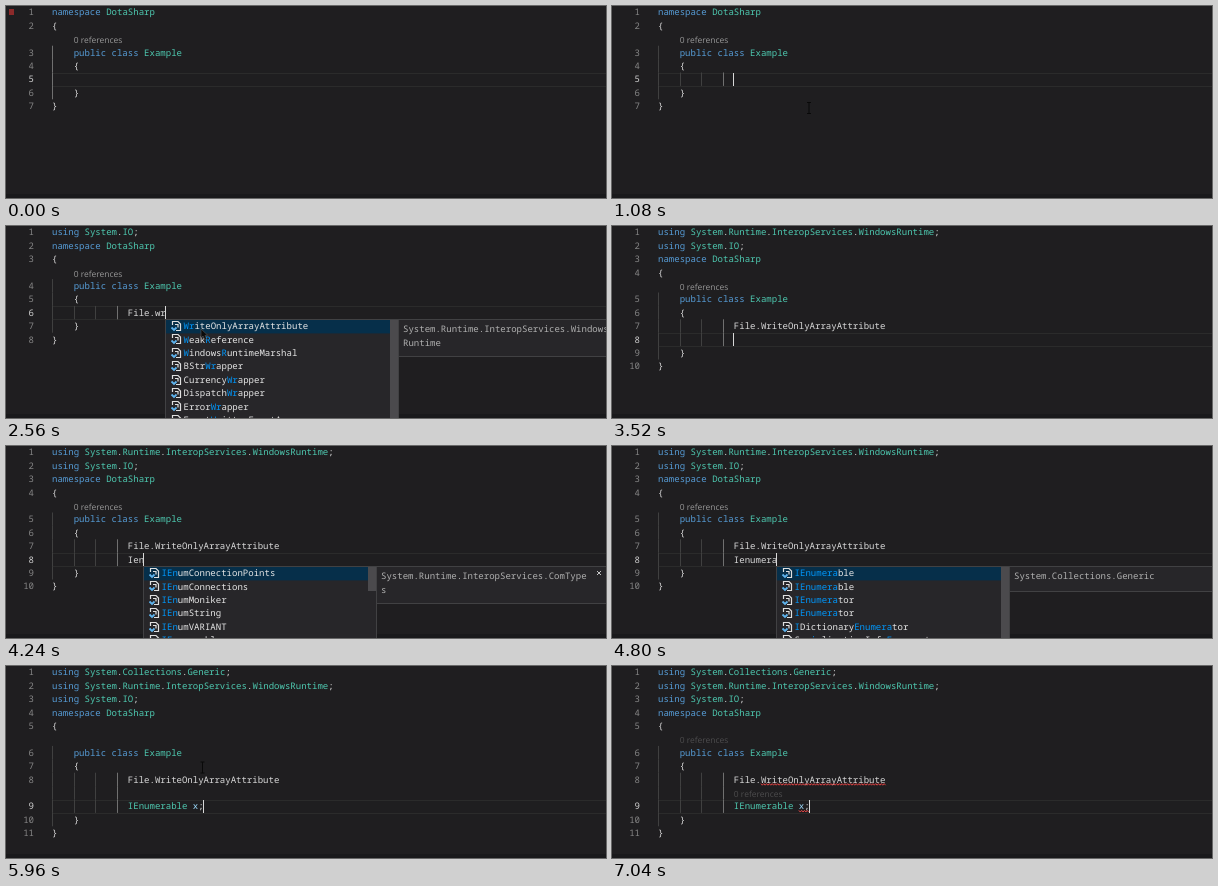
An HTML page with a canvas that plays this animation: 600x192 px, repeating every 7.08 s.

```html
<!DOCTYPE html>
<html lang="en">
<head>
<meta charset="utf-8">
<title>Auto using completion</title>
<style>
html, body { margin: 0; width: 100%; height: 100%; overflow: hidden; background: #1f1e20; }
canvas { display: block; width: 600px; height: 192px; }
</style>
</head>
<body>
<canvas id="c" width="600" height="192"></canvas>
<script>
const ctx = document.getElementById('c').getContext('2d');
const LOOP = 7080, CW = 5.418, LH = 13.4, LEFT = 46, INDENT = 14;
const MONO = "9.03px 'Noto Sans Mono', 'DejaVu Sans Mono', monospace";
const SANS = "8.45px 'Open Sans', 'Noto Sans', sans-serif";
const C = {
  bg: '#1f1e20', text: '#dadada', key: '#569cd6', type: '#4ec9b0', local: '#9cdcfe',
  num: '#858585', numOn: '#d0d0d0', lens: '#999999', guide: '#404040', guideOn: '#707070',
  border: '#414143', panel: '#272629', pick: '#062f4a', match: '#0097fb', error: '#f44747',
  item: '#e6e6e6', slider: '#4b4a4d'
};

const USINGS = ['System.Collections.Generic', 'System.Runtime.InteropServices.WindowsRuntime', 'System.IO'];
const ATTR = 'File.WriteOnlyArrayAttribute';

// [time, number of usings, first line, second line]
const EDITS = [
  [-600, 0, null], [900, 0, ''], [1200, 0, 'F'], [1400, 0, 'Fi'], [1720, 0, 'Fil'], [1840, 0, 'File'],
  [2080, 1, 'File'], [2240, 1, 'File.'], [2400, 1, 'File.w'], [2520, 1, 'File.wr'],
  [2880, 2, ATTR], [3320, 2, ATTR, '']
];
[3800, 4000, 4200, 4360, 4460, 4560, 4660, 4760].forEach((t, i) =>
  EDITS.push([t, 2, ATTR, 'Ienumera'.slice(0, i + 1)]));
EDITS.push([5080, 3, ATTR, 'IEnumerable'], [5280, 3, ATTR, 'IEnumerable '],
  [5440, 3, ATTR, 'IEnumerable x'], [5600, 3, ATTR, 'IEnumerable x;']);

// max: typed letters marked in the list; bar: height of the scroll slider
const POPUPS = [
  { from: 1240, to: 1840, max: 2, bar: 24, doc: ['System'],
    items: 'FieldAccessException FieldAttributes FieldBuilder FieldInfo FieldOffsetAttribute FieldToken File FileAccess FileInfo' },
  { from: 1840, to: 2080, max: 4, bar: 80, doc: ['System.IO'],
    items: 'File FileAccess FileAttributes FileInfo FileLoadException FileMode FileNotFoundException FileOptions FileShare' },
  { from: 2420, to: 2880, max: 2, bar: 110, doc: ['System.Runtime.InteropServices.Windows', 'Runtime'],
    items: 'WriteOnlyArrayAttribute WeakReference WindowsRuntimeMarshal BStrWrapper CurrencyWrapper DispatchWrapper ErrorWrapper EventWrittenEventArgs' },
  { from: 3840, to: 4480, max: 5, bar: 24, doc: ['System.Runtime.InteropServices.ComType', 's'],
    items: 'IEnumConnectionPoints IEnumConnections IEnumMoniker IEnumString IEnumVARIANT IEnumerable' },
  { from: 4480, to: 5080, max: 8, bar: 110, doc: ['System.Collections.Generic'],
    items: 'IEnumerable IEnumerable IEnumerator IEnumerator IDictionaryEnumerator SerializationInfoEnumerator' }
];

const rowY = i => 6.2 + i * LH;
const colX = c => LEFT + c * CW;

function rect(x, y, w, h, color) {
  ctx.fillStyle = color;
  ctx.fillRect(x, y, w, h);
}

function frame(x, y, w, h) {
  rect(x, y, w, h, C.panel);
  ctx.strokeStyle = C.border;
  ctx.lineWidth = 1;
  ctx.strokeRect(x + .5, y + .5, w - 1, h - 1);
}

function path(points, color) {
  ctx.strokeStyle = color;
  ctx.beginPath();
  points.forEach(([x, y]) => ctx.lineTo(x, y));
  ctx.stroke();
}

function put(s, x, y, color, font = MONO) {
  ctx.font = font;
  ctx.fillStyle = color;
  ctx.fillText(s, x, y + 3.2);
}

// Draws [text, color] pairs one after another on the character grid.
function putParts(parts, x, y) {
  for (const [s, color] of parts) {
    put(s, x, y, color);
    x += s.length * CW;
  }
}

function usingParts(name) {
  const parts = [['using ', C.key]];
  name.split('.').forEach((s, i) => {
    if (i) parts.push(['.', C.text]);
    parts.push([s, C.type]);
  });
  return parts.concat([[';', C.text]]);
}

function secondParts(s, t) {
  const word = s.slice(0, 11);
  const parts = [[word, t > 5400 ? C.type : C.text]];
  for (const ch of s.slice(11)) parts.push([ch, ch === 'x' ? C.local : C.text]);
  return parts;
}

function buildRows(edit, t) {
  const [, used, first, second] = edit, rows = [];
  const add = (col, parts, more) => rows.push({ col, parts, ...more });
  for (const u of USINGS.slice(3 - used)) add(0, usingParts(u));
  add(0, [['namespace ', C.key], ['DotaSharp', C.type]]);
  add(0, [['{', C.text]]);
  rows.push({ lens: true, col: 4 });
  add(4, [['public class ', C.key], ['Example', C.type]], { depth: 1 });
  add(4, [['{', C.text]], { depth: 1 });
  const here = second === undefined;
  add(INDENT, [[first || '', C.text]], { depth: first === null ? 1 : 4, on: here, text: first || '' });
  if (!here) {
    if (t >= 5840) rows.push({ lens: true, col: INDENT });
    add(INDENT, secondParts(second, t), { depth: 4, on: true, text: second });
  }
  add(4, [['}', C.text]], { depth: 1 });
  add(0, [['}', C.text]]);
  return rows;
}

function lensAlpha(t) {
  if (t < 5840) return 1;
  return .38 * Math.max(0, Math.min(1, (t - 6800) / 200));
}

function matched(word, query) {
  const low = word.toLowerCase(), hits = new Set();
  const mark = (i, n) => { for (let k = 0; k < n; k++) hits.add(i + k); };
  const at = low.indexOf(query);
  if (at >= 0) mark(at, query.length);
  else {
    const head = low.indexOf(query[0]);
    mark(head, 1);
    mark(low.indexOf(query.slice(1), head + 1), query.length - 1);
  }
  return [...word].map((ch, i) => [ch, hits.has(i) ? C.match : C.item]);
}

function classIcon(x, y) {
  ctx.lineWidth = 1.2;
  path([[x - 3.5, y - 1], [x - 3.5, y - 4.5], [x + 2, y - 4.5], [x + 4.5, y - 2],
    [x + 4.5, y + 4.5], [x, y + 4.5]], '#e0e0e0');
  path([[x - 1, y - 1.5], [x + 2, y - 1.5], [x + 2, y + 1.5]], '#e0e0e0');
  ctx.lineWidth = 1.8;
  path([[x - 4.5, y + 1.5], [x - 2, y + 4], [x + .5, y + 1.5]], '#5fb4ee');
}

function drawPopup(p, x, top, query) {
  top = Math.round(top);
  frame(x, top, 234, 200);
  rect(x + 1, top + 1, 232, LH, C.pick);
  rect(x + 225, top + 1, 8, p.bar, C.slider);
  p.items.split(' ').forEach((word, i) => {
    const y = top + 7 + i * LH;
    classIcon(x + 11, Math.round(y));
    putParts(matched(word, query), x + 18.6, y);
  });
  const dx = x + 233;
  frame(dx, top, 231, p.doc.length > 1 ? 38 : 26);
  p.doc.forEach((s, i) => put(s, dx + 5, top + 10 + i * LH, '#b0b0b0'));
  ctx.lineWidth = 1;
  path([[x + 454, top + 5], [x + 458, top + 9]], '#c5c5c5');
  path([[x + 458, top + 5], [x + 454, top + 9]], '#c5c5c5');
}

function squiggle(x0, x1, y) {
  ctx.lineWidth = .9;
  const points = [];
  for (let x = x0, i = 0; x <= x1; x += 1.4, i++) points.push([x, y + (i % 2 ? .8 : -.8)]);
  path(points, C.error);
}

function beam(x, y) {
  ctx.lineWidth = 1;
  for (const d of [-5.5, 5.5]) path([[x - 2, y + d], [x + 2, y + d]], '#090909');
  path([[x, y - 5.5], [x, y + 5.5]], '#090909');
}

function arrow(x, y) {
  ctx.beginPath();
  [[0, 0], [0, 9], [2, 7], [4, 11], [5.5, 10], [4, 6.5], [6.5, 6]].forEach(([a, b]) => ctx.lineTo(x + a, y + b));
  ctx.closePath();
  ctx.fillStyle = '#0b0b0b';
  ctx.fill();
  ctx.strokeStyle = '#666';
  ctx.lineWidth = .5;
  ctx.stroke();
}

function drawMouse(t, popup) {
  if (t >= 40 && t < 1240) {
    const k = Math.min(1, (t - 40) / 680), e = k * k * (3 - 2 * k);
    beam(436 - 239 * e, 181 - 79 * e);
  } else if (popup && t < 2900) arrow(195, 103);
  else if (t >= 5840 && t < 6600) beam(196.5, 101.5);
}

function draw(t) {
  const edit = EDITS.filter(e => e[0] <= t).pop();
  const rows = buildRows(edit, t);
  const popup = POPUPS.find(p => t >= p.from && t < p.to);
  const cur = rows.findIndex(r => r.on), line = rows[cur];
  const caret = Math.floor((edit[2] === null ? colX(8) : colX(INDENT + line.text.length)) - .5);

  rect(0, 0, 600, 192, C.bg);
  rect(0, 188, 600, 4, '#19191b');
  if (t < 120) rect(3, 3, 5, 6, '#8c2a2a');

  const top = Math.round(rowY(cur) - LH / 2);
  rect(LEFT, top, 554, 1, '#2b2b2b');
  rect(LEFT, top + 13, 554, 1, '#2b2b2b');

  let n = 0;
  rows.forEach((r, i) => {
    const y = rowY(i);
    const depth = r.lens ? (r.col === INDENT ? 4 : 0) : r.depth || 0;
    for (let d = 0; d < depth; d++) {
      const active = edit[2] === null ? d === 0 : d === 3;
      rect(Math.round(colX(d * 4)), y - LH / 2, 1, LH, active ? C.guideOn : C.guide);
    }
    if (r.lens) {
      ctx.globalAlpha = lensAlpha(t);
      put('0 references', colX(r.col), y + 1, C.lens, SANS);
      ctx.globalAlpha = 1;
      return;
    }
    const label = String(++n);
    put(label, 28 - label.length * CW, y, r.on ? C.numOn : C.num);
    putParts(r.parts, colX(r.col), y);
  });

  if (t >= 6400) {
    squiggle(colX(INDENT + 5), colX(INDENT + ATTR.length), rowY(cur - 2) + 5);
    squiggle(colX(INDENT + 12), colX(INDENT + 14), rowY(cur) + 5);
  }
  if (popup) {
    const query = line.text.split('.').pop().toLowerCase().slice(0, popup.max);
    drawPopup(popup, caret, rowY(cur) + LH / 2, query);
  }
  if ((t - edit[0]) % 1060 < 530) rect(caret, top, 1, 13, '#d8d8d8');
  drawMouse(t, popup);
}

ctx.textRendering = 'geometricPrecision';
const start = performance.now();
function tick() {
  draw((performance.now() - start) % LOOP);
  requestAnimationFrame(tick);
}
tick();
</script>
</body>
</html>
```
